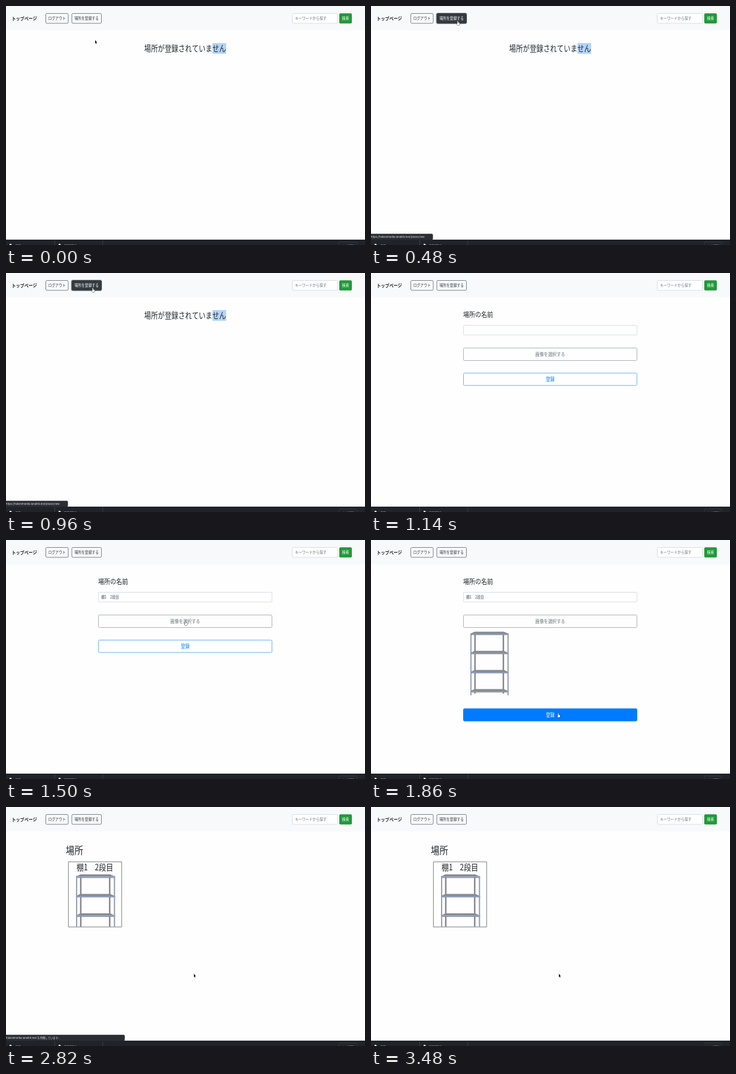
Recreate the animation shown at these times as an HTML page with a canvas. Size 600 px wide and 400 px high, loop 3.66 s.

```html
<!DOCTYPE html>
<html lang="ja">
<head>
<meta charset="utf-8">
<title>場所の登録</title>
<style>
html, body { margin: 0; width: 100%; height: 100%; overflow: hidden; background: #fefefe; }
canvas { display: block; width: 600px; height: 400px; }
</style>
</head>
<body>
<canvas id="stage"></canvas>
<script>
const LOOP = 3660, STEP = 60;
const SQUEEZE = 0.85; // the wide screen is shown on a 3:2 stage
const FONT = '"Noto Sans CJK JP", "Noto Sans CJK", "Noto Sans", sans-serif';
const HOST = 'hakonimoriba.tanalink.test';
const PLACE = '棚1　2段目';
const PAGE = '#fefefe', INK = '#212529', GRAY = '#6c757d', DARK = '#343a40',
  BLUE = '#007bff', GREEN = '#21993a', LINE = '#d5dae6', BAR = '#20232a', BAR_TEXT = '#d5d7dc';

// Moments of the recorded session, in ms
const HOVER = 360, LINK_SHOWN = 480, FORM = 1080, TYPE_FROM = 1200, TYPE_STEP = 60,
  POINTER_BACK = 1500, PICTURE = 1620, SUBMIT_HOVER = 1800, SENT = 2220,
  RESULT = 2760, LOADED = 3060;

// time, x, y of the pointer
const PATH = [
  [0, 149, 57], [360, 145, 25], [1080, 145, 25], [1500, 300, 136], [1620, 300, 136],
  [1800, 313, 290], [2220, 313, 291], [2640, 313, 291], [2820, 314, 279]
];

const canvas = document.getElementById('stage');
const ctx = canvas.getContext('2d');
const ratio = window.devicePixelRatio || 1;
canvas.width = 600 * ratio;
canvas.height = 400 * ratio;

function rect(x, y, w, h, color) {
  ctx.fillStyle = color;
  ctx.fillRect(x, y, w, h);
}

function box(x, y, w, h, { fill, stroke, radius = 2, width = 0.9 }) {
  ctx.beginPath();
  ctx.roundRect(x, y, w, h, radius);
  if (fill) { ctx.fillStyle = fill; ctx.fill(); }
  if (stroke) { ctx.strokeStyle = stroke; ctx.lineWidth = width; ctx.stroke(); }
}

function text(value, x, y, size, color = INK, { align = 'left', weight = 400, font = FONT } = {}) {
  ctx.save();
  ctx.translate(x, y);
  ctx.scale(SQUEEZE, 1);
  ctx.font = `${weight} ${size}px ${font}`;
  ctx.textAlign = align;
  ctx.textBaseline = 'alphabetic';
  ctx.fillStyle = color;
  ctx.fillText(value, 0, size * 0.37);
  ctx.restore();
}

function button(label, x, y, w, h, size, color, style) {
  box(x, y, w, h, style);
  text(label, x + w / 2, y + h / 2, size, color, { align: 'center', weight: 500 });
}

function polygon(points, fill, stroke) {
  ctx.beginPath();
  points.forEach(([x, y]) => ctx.lineTo(x, y));
  ctx.closePath();
  if (stroke) {
    ctx.strokeStyle = stroke;
    ctx.lineWidth = 0.9;
    ctx.lineJoin = 'round';
    ctx.stroke();
  }
  ctx.fillStyle = fill;
  ctx.fill();
}

function header(hovered) {
  rect(0, 0, 600, 41, '#f8f9fa');
  text('トップページ', 9.5, 20.5, 8.3, INK, { weight: 700 });
  button('ログアウト', 66.5, 12.5, 37.5, 16.5, 6.8, DARK, { stroke: GRAY });
  if (hovered) box(108.5, 11.3, 52, 19, { fill: '#abaeb4', radius: 3 });
  button('場所を登録する', 110, 12.5, 49.5, 16.5, 6.8, hovered ? '#fff' : DARK,
    { stroke: hovered ? DARK : GRAY, fill: hovered ? DARK : null });
  box(478.5, 12.5, 76, 16.5, { fill: '#fff', stroke: LINE });
  text('キーワードから探す', 483, 20.7, 6.9, GRAY);
  button('検索', 557, 12.3, 21, 17, 7, '#fff', { fill: GREEN });
}

function downloadBar() {
  rect(0, 391, 600, 9, BAR);
  rect(81, 392, 0.7, 8, '#464952');
  rect(161.5, 392, 0.7, 8, '#464952');
  for (const x of [6, 88]) polygon([[x, 398], [x + 2.2, 398], [x + 4, 400], [x, 400]], '#f2f3f5');
  text('録画', 16, 401, 5, BAR_TEXT);
  text('画面収録 2.mov', 97, 401, 5, BAR_TEXT);
  box(557, 395, 29, 9, { stroke: '#3c3f48', radius: 1.5, width: 0.7 });
  text('すべて表示', 572, 401, 4.8, BAR_TEXT, { align: 'center' });
}

function statusBar(message, width) {
  box(-3, 381.3, width + 3, 10, { fill: '#2b2d33' });
  text(message, 0, 386.4, 5.1, BAR_TEXT, { font: `Roboto, ${FONT}` });
}

function shelf(x, y, scale) {
  ctx.save();
  ctx.translate(x, y);
  ctx.scale(scale, scale);
  for (const px of [6.6, 54]) rect(px, 2, 2.4, 102, '#85868c');
  for (let i = 0; i < 4; i++) {
    const top = i * 32;
    polygon([[7, top + 0.5], [56, top + 0.5], [64, top + 4], [0, top + 4]], '#858a92');
    rect(0, top + 4, 64, 2, '#98a3bc');
    rect(0, top + 5.6, 64, 0.5, '#6d7588');
  }
  for (const px of [0, 62]) {
    rect(px, 3, 1.8, 104, '#9ca6bd');
    rect(px + 1.4, 3, 0.5, 104, '#737b8e');
  }
  ctx.restore();
}

function emptyPage() {
  rect(345, 62, 23, 18, '#b3d4fc');
  text('場所が登録されていません', 231, 71, 13.4);
}

function formPage(t) {
  const typed = Math.max(0, Math.floor((t - TYPE_FROM) / TYPE_STEP) + 1);
  const picture = t >= PICTURE;
  const hovered = t >= SUBMIT_HOVER && t < SENT;
  const sent = t >= SENT;
  text('場所の名前', 154, 69.5, 11.8);
  box(154.5, 87.5, 290, 16.3, { stroke: LINE, fill: '#fff', radius: 1.5 });
  text(PLACE.slice(0, typed), 159, 95.8, 6.9, '#495057');
  button('画像を選択する', 154.5, 125.5, 290, 21, 8.4, GRAY, { stroke: '#a3a9b5' });
  if (picture) shelf(166, 153, 1);
  let color = BLUE, style = { stroke: '#5caaf5' };
  if (hovered) { color = '#fff'; style = { fill: BLUE, stroke: BLUE }; }
  if (sent) { color = '#65aff8'; style = { stroke: '#92c5f8' }; }
  button('登録', 154.5, picture ? 282.3 : 167.5, 290, 20.7, 8.6, color, style);
}

function resultPage() {
  text('場所', 100, 73, 17);
  box(104.3, 91.8, 89, 109, { stroke: '#6b6e75', radius: 0 });
  text(PLACE, 118, 101, 14.1);
  ctx.save();
  ctx.beginPath();
  ctx.rect(104.7, 92.2, 88.2, 108.2);
  ctx.clip();
  shelf(117, 112.3, 1.02);
  ctx.restore();
}

function pointerAt(t) {
  const next = PATH.findIndex(key => key[0] > t);
  if (next < 0) return PATH[PATH.length - 1].slice(1);
  const [t0, x0, y0] = PATH[next - 1], [t1, x1, y1] = PATH[next];
  const p = (t - t0) / (t1 - t0), eased = p * p * (3 - 2 * p);
  return [x0 + (x1 - x0) * eased, y0 + (y1 - y0) * eased];
}

function pointer(t) {
  if (t >= FORM && t < POINTER_BACK) return;
  const [x, y] = pointerAt(t);
  const hand = (t >= HOVER && t < FORM) || (t >= POINTER_BACK && t <= PICTURE) ||
    (t >= SUBMIT_HOVER && t < SENT);
  ctx.save();
  ctx.translate(x, y);
  if (hand) {
    polygon([[-0.6, 0], [0.5, 0], [0.7, 2.4], [2.8, 3], [3, 5], [2.2, 7], [-0.5, 7], [-2, 4.4], [-0.6, 4.6]],
      '#fff', '#111');
  } else {
    polygon([[0, 0], [0, 5.6], [1, 4.7], [1.7, 6.6], [2.5, 6.2], [1.8, 4.4], [3.2, 4.3]],
      '#111', '#f4f4f4');
  }
  ctx.restore();
}

function draw(t) {
  ctx.setTransform(ratio, 0, 0, ratio, 0, 0);
  rect(0, 0, 600, 400, PAGE);
  header(t >= HOVER && t < FORM);
  if (t < FORM) emptyPage();
  else if (t < RESULT) formPage(t);
  else resultPage();
  downloadBar();
  if (t >= LINK_SHOWN && t < FORM) statusBar(`https://${HOST}/places/new`, 103.5);
  if (t >= SENT && t < LOADED) statusBar(`${HOST} を待機しています...`, 198.5);
  pointer(t);
}

const start = performance.now();
function tick() {
  const t = (performance.now() - start) % LOOP;
  draw(Math.floor(t / STEP) * STEP);
  requestAnimationFrame(tick);
}
tick();
</script>
</body>
</html>
```
